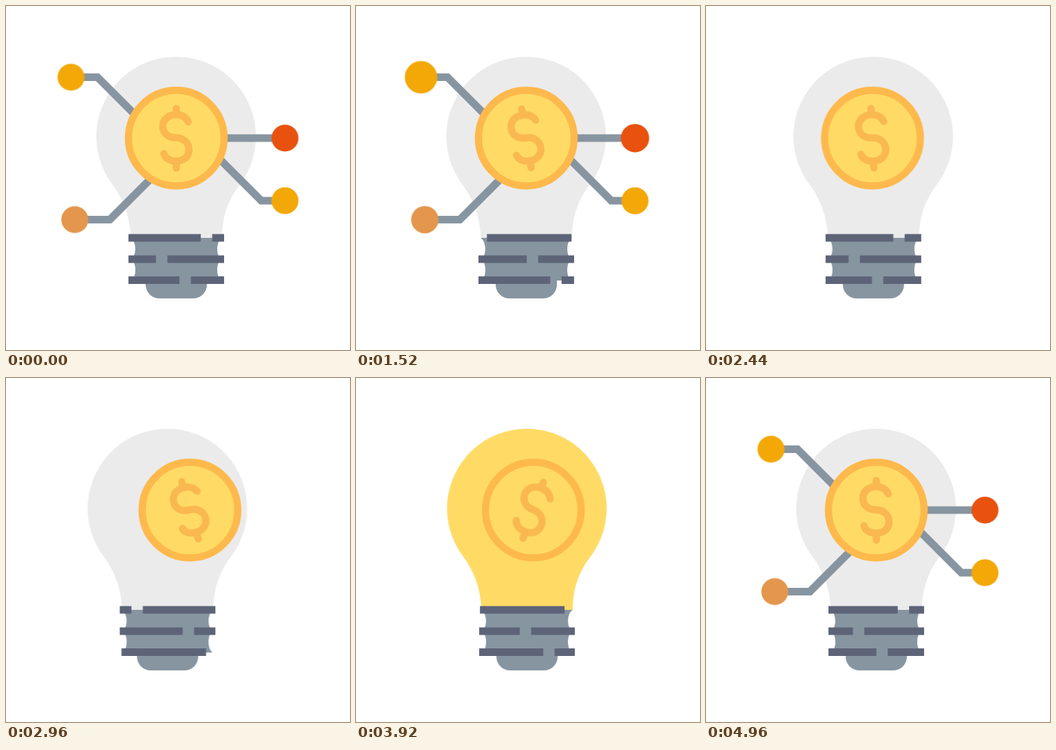
An HTML page without scripts for the animation above (5 s loop, 500 by 500 pixels).

```html
<!DOCTYPE html>
<html lang="en">
<head>
<meta charset="utf-8">
<title>Idea bulb</title>
<style>
  html, body { margin: 0; width: 100%; height: 100%; overflow: hidden; background: #fff; }
  svg { display: block; width: 100vw; height: 100vh; }

  .bulb, .glass, .coin, .disc, .spin, .sign, .wire, .out, .in {
    animation: 5s ease-in-out infinite;
  }
  .disc, .spin, .sign { transform-origin: 247.5px 192px; }

  .bulb { animation-name: sway; }
  .glass { fill: #ebebeb; animation-name: glow; }
  .base { fill: #8795a1; }
  .thread {
    stroke: #5d6478; stroke-width: 11; stroke-dasharray: 123 16.5;
    animation: screw 1.25s linear infinite;
  }

  .wire {
    fill: none; stroke: #8795a1; stroke-width: 11;
    stroke-dasharray: 1 2; animation-name: retract;
  }
  .out { animation-name: leave; animation-delay: calc(var(--leave) - 5s); }
  .in { animation-name: enter; animation-delay: calc(var(--enter) - 5s); }

  .coin { animation-name: slide; }
  .disc { fill: #ffdb66; stroke: #feb94c; stroke-width: 10.5; animation-name: swell; }
  .spin { animation-name: rock; }
  .sign {
    fill: none; stroke: #fab850; stroke-width: 10.5; stroke-linecap: round;
    animation-name: shrink;
  }

  @keyframes screw {
    from { stroke-dashoffset: 139.5; }
    to { stroke-dashoffset: 0; }
  }
  @keyframes sway {
    0%, 47%, 80%, 100% { transform: translateX(0); }
    54% { transform: translateX(-30px); }
    68% { transform: translateX(30px); }
  }
  @keyframes glow {
    0%, 69%, 88%, 100% { fill: #ebebeb; }
    76%, 81% { fill: #ffdb66; }
  }
  @keyframes slide {
    0%, 47%, 84%, 100% { transform: translateX(0); }
    54% { transform: translateX(-40px); }
    62%, 68% { transform: translateX(40px); }
  }
  @keyframes swell {
    0%, 20%, 100% { transform: scale(1); }
    10% { transform: scale(1.2); }
  }
  @keyframes shrink {
    0%, 20%, 100% { transform: scale(1); }
    10% { transform: scale(.62); }
  }
  @keyframes rock {
    0%, 27.2%, 47%, 87%, 100% { transform: rotate(0deg); }
    34%, 54% { transform: rotate(-20deg); }
    41%, 78% { transform: rotate(20deg); }
  }
  @keyframes retract {
    0%, 42.4%, 86%, 100% { stroke-dashoffset: 0; }
    48%, 80% { stroke-dashoffset: 1.01; }
  }
  /* The dots leave and return in different orders, so each has two nested scales. */
  @keyframes leave {
    0%, 27.5% { transform: scale(1); }
    32.3% { transform: scale(1.3); }
    38% { transform: scale(0); }
    70% { transform: scale(0); animation-timing-function: step-end; }
    70.1%, 100% { transform: scale(1); }
  }
  @keyframes enter {
    0% { transform: scale(1); }
    55% { transform: scale(1); animation-timing-function: step-end; }
    55.1%, 82% { transform: scale(0); }
    87.2% { transform: scale(1.3); }
    92%, 100% { transform: scale(1); }
  }
</style>
</head>
<body>
<svg viewBox="0 0 500 500">
  <g class="bulb">
    <path class="glass" d="M181.5 337C180 305 170 280 155 260A116 116 0 1 1 339.5 260C324 280 314 305 314 337Z"/>
    <path class="base" d="M181 337H314C305 342 305 363 313 368C305 373 305 394 313 399H292V405A20 20 0 0 1 272 425H223A20 20 0 0 1 203 405V399H182C190 394 190 373 182 368C190 363 190 342 181 337Z"/>
    <path class="thread" style="animation-delay:-1.089s" d="M178 337H317"/>
    <path class="thread" style="animation-delay:-.506s" d="M178 368H317"/>
    <path class="thread" style="animation-delay:-.811s" d="M178 398.5H317"/>
  </g>

  <path class="wire" pathLength="1" d="M200 170.5L133 103.5H94.5"/>
  <path class="wire" pathLength="1" d="M300 192H405.5"/>
  <path class="wire" pathLength="1" d="M295 207L371 283H405.5"/>
  <path class="wire" pathLength="1" d="M225 236.5L151 310.5H100"/>

  <g transform="translate(94.5 103.5)" style="--leave:0s;--enter:.21s">
    <g class="out"><circle class="in" r="19.6" fill="#f3a807"/></g>
  </g>
  <g transform="translate(405.5 192)" style="--leave:.077s;--enter:.1s">
    <g class="out"><circle class="in" r="19.6" fill="#e8520e"/></g>
  </g>
  <g transform="translate(405.5 283)" style="--leave:.134s;--enter:0s">
    <g class="out"><circle class="in" r="19.6" fill="#f3a807"/></g>
  </g>
  <g transform="translate(100 310.5)" style="--leave:.108s;--enter:.07s">
    <g class="out"><circle class="in" r="19.6" fill="#e4964c"/></g>
  </g>

  <g class="coin">
    <circle class="disc" cx="247.5" cy="192" r="69.5"/>
    <g class="spin">
      <path class="sign" d="M265 168.5C262 161.5 255 158 247 158C236 158 228 165 228 175S236 191.5 247 191.5S266 199 266 209S258 225.5 247 225.5C238 225.5 231 221 229.5 214.5M247.5 149V157M247.5 227V235.5"/>
    </g>
  </g>
</svg>
</body>
</html>
```
